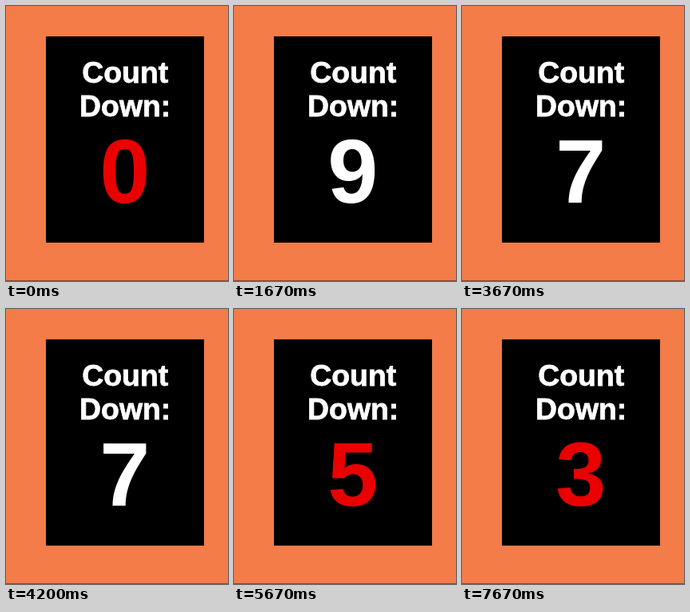
These frames come from a looping animation (278x344 px, 8000 ms). An HTML page:

```html
<!DOCTYPE html>
<html lang="en">
<head>
<meta charset="utf-8">
<title>Count Down</title>
<style>
  html, body { margin: 0; width: 100%; height: 100%; overflow: hidden; background: #f37c48; }
  svg { display: block; width: 278px; height: 344px; }
  text {
    font: bold 37.4px "Liberation Sans", Arial, sans-serif;
    text-anchor: middle; fill: #fff; stroke: #fff; stroke-width: 0.8px;
  }
  #digit { font-size: 113.5px; stroke: none; }
</style>
</head>
<body>
<svg viewBox="0 0 278 344">
  <rect width="278" height="344" fill="#f37c48"/>
  <rect y="343" width="278" height="1" fill="#8a4a30"/>
  <rect x="50" y="38" width="198" height="258"/>
  <text x="149.2" y="95.8">Count</text>
  <text x="149.2" y="137.8">Down:</text>
  <!-- footless "1" for the two-digit count -->
  <path id="one" fill="#fff" d="M129 246V167.5H117C115.5 176 107 180.5 94.5 180.5V191H112.5V246Z"/>
  <text id="digit" y="246"></text>
</svg>
<script>
  const LOOP = 8000;
  const steps = [[0, 0], [670, 10], [1670, 9], [2600, 8], [3670, 7],
                 [4670, 6], [5670, 5], [6670, 4], [7670, 3]];
  const one = document.getElementById("one");
  const digit = document.getElementById("digit");
  const start = performance.now();

  function draw() {
    const time = Math.max(0, performance.now() - start) % LOOP;
    const count = steps.filter(([at]) => at <= time).pop()[1];
    const isTen = count === 10;
    one.style.display = isTen ? "" : "none";
    digit.textContent = count % 10;
    digit.setAttribute("x", isTen ? 179.5 : 148.8);
    digit.style.fill = count <= 5 ? "#ea0000" : "#fff";
    requestAnimationFrame(draw);
  }
  draw();
</script>
</body>
</html>
```
